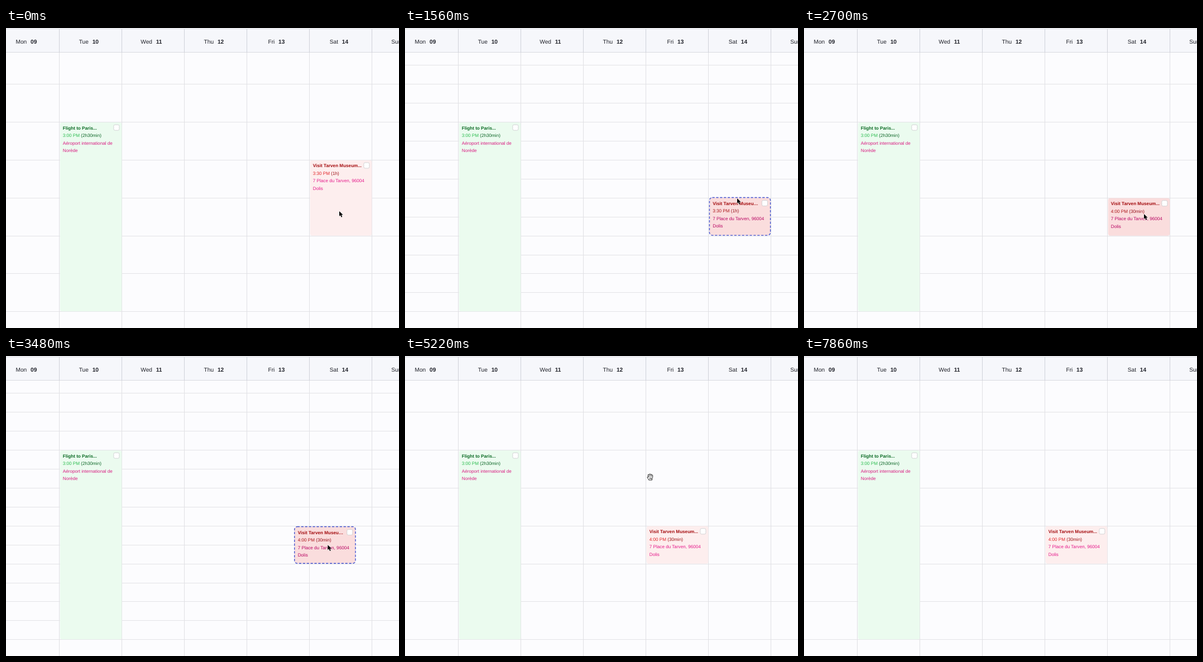
Animation, 704 px wide and 537 px high, one loop 7.92 s. Source, as an HTML page:

```html
<!DOCTYPE html>
<html lang="en">
<head>
<meta charset="utf-8">
<title>Week calendar</title>
<style>
  html, body { margin: 0; width: 100%; height: 100%; overflow: hidden; background: #fcfcfe; }
  svg { display: block; width: 704px; height: 537px; }
  text { font: 8.14px "Liberation Sans", Arial, sans-serif; text-rendering: geometricPrecision; white-space: pre; }
  .day { font-size: 10.17px; fill: #20222a; }
  .title, .num { font-weight: bold; }
  .box { fill: var(--bg); }
  .title { fill: var(--title); }
  .time { fill: var(--time); }
  .len { fill: var(--len); }
  .place { fill: var(--place); }
  .check { fill: #fff; stroke: #c9cbcd; stroke-width: .8; }
  .green { --bg: #ebfbef; --title: #0c6b25; --time: #2cbd50; --len: #0b6526; --place: #d91c82; }
  .red { --bg: #fdeeee; --title: #a50d10; --time: #e2262a; --len: #9c1014; --place: #e5198a; }
  .red.hover { --bg: #fadddd; --title: #a30c0f; --time: #ac1519; --len: #96101a; --place: #b80562; }
  .edit .box { stroke: #4757d0; stroke-width: 1.4; stroke-dasharray: 4.3 2.6; }
</style>
</head>
<body>
<svg id="stage" viewBox="0 0 704 537"></svg>
<script>
const LOOP = 7920, STEP = 60;
const COL = 112, ROW = 67.85, COL0 = 95, ROW0 = 100.2;
const SAT = 543.5, FRI = 431.5, TOP_1H = 236.8, TOP_30 = 304.6, BOTTOM = 371.8;
const stage = document.getElementById("stage");

function add(parent, tag, attrs = {}, text) {
  const el = document.createElementNS("http://www.w3.org/2000/svg", tag);
  set(el, attrs);
  if (text !== undefined) el.textContent = text;
  parent.append(el);
  return el;
}
function set(el, attrs) {
  for (const k in attrs) el.setAttribute(k, attrs[k]);
}
const rect = (parent, x, y, width, height, fill) =>
  add(parent, "rect", { x, y, width, height, fill });

// Grid: hour rows always, half rows only while editing
const grid = add(stage, "g");
const halves = add(stage, "g");
for (let i = 0; i < 7; i++) {
  rect(grid, 0, Math.round(ROW0 + i * ROW), 704, 1, "#e3e3e6");
  rect(halves, 0, Math.round(ROW0 + (i - .5) * ROW), 704, 1, "#e3e3e6");
}
for (let i = 0; i < 6; i++) rect(grid, COL0 + i * COL, 44, 1, 493, "#e0e0e4");

// Header
const head = add(stage, "g");
rect(head, 0, 2, 704, 41, "#f6f7fb");
rect(head, 0, 1, 704, 1, "#d6d8de");
rect(head, 0, 43, 704, 1, "#d9dae0");
["Mon", "Tue", "Wed", "Thu", "Fri", "Sat", "Sun"].forEach((name, i) => {
  if (i < 6) rect(head, COL0 + i * COL, 2, 1, 42, "#cfd1d9");
  const label = add(head, "text", { class: "day", x: 36.4 + i * COL, y: 27.6, "text-anchor": "middle" });
  add(label, "tspan", {}, name);
  add(label, "tspan", { class: "num", dx: 6.8 }, String(9 + i).padStart(2, "0"));
});

function makeEvent(cls, lines) {
  const g = add(stage, "g", { class: cls });
  const ev = { g, box: add(g, "rect", { class: "box" }) };
  ev.title = add(g, "text", { class: "title" });
  ev.when = add(g, "text");
  ev.time = add(ev.when, "tspan", { class: "time" });
  ev.len = add(ev.when, "tspan", { class: "len" });
  ev.places = lines.map(s => add(g, "text", { class: "place" }, s));
  ev.check = add(g, "rect", { class: "check", width: 10, height: 10, rx: 2.4 });
  return ev;
}
function drawEvent(ev, x, top, bottom, o) {
  const pad = o.edit ? 1.5 : 0, inset = o.edit ? .7 : 0;
  set(ev.box, { x: x + 1.2 + inset, y: top + inset, width: 110.6 - 2 * inset, height: bottom - top - 2 * inset, rx: o.edit ? 5 : 4 });
  [ev.title, ev.when, ...ev.places].forEach((el, i) =>
    set(el, { x: x + 6.3 + pad, y: top + 12.5 + pad + i * 13.56 }));
  set(ev.check, { x: x + 97.4 - pad, y: top + 4.2 + pad });
  ev.title.textContent = o.title;
  ev.time.textContent = o.time;
  ev.len.textContent = " " + o.len;
}

const flight = makeEvent("green", ["Aéroport international de", "Norède"]);
drawEvent(flight, 95.5, 169, 507.3, { title: "Flight to Paris...", time: "3:00 PM", len: "(2h30min)" });
const visit = makeEvent("red", ["7 Place du Tarven, 96004", "Dolis"]);

// Pointers
const arrow = add(stage, "path", {
  d: "M0 0V9L2.1 7.1L3.7 10.8L5.4 10L3.8 6.5H6.7Z",
  fill: "#000", stroke: "#fff", "stroke-width": 1, "stroke-linejoin": "round", "paint-order": "stroke"
});
const hand = add(stage, "g", { fill: "#fff", stroke: "#111", "stroke-width": .95, "stroke-linejoin": "round", "stroke-linecap": "round" });
add(hand, "path", { d: "M-2.4 5.6C-2.8 3.8-5 2.3-4.9 .9C-4.8-.1-3.4 0-2.7 1L-3.9-2.6C-4.1-4-2.4-4.4-1.9-3.2C-2-5.2 .3-5.4 .6-3.8C1.2-5 2.8-4.6 2.9-3.1C3.7-3.6 4.7-3 4.7-1.8C4.8 .6 4.6 2.2 3.5 3.8V5.6Z" });
add(hand, "path", { d: "M-1.9-3.2L-1.2-.4M.6-3.8L.8-.6M2.9-3.1L2.7-.4M-.6 2V3.8M.9 2V3.8M2.3 2V3.8", fill: "none", "stroke-width": .75 });

// Pointer path: time, x, y
const path = [
  [0, 597, 328], [420, 597, 328], [840, 594.5, 239], [1020, 594.5, 239],
  [1560, 595, 305], [1680, 595, 306.8], [1740, 595, 306.8], [1980, 600, 272],
  [2160, 600, 272], [2520, 609, 333], [2760, 609, 333], [3000, 605, 338],
  [3300, 605, 338], [3840, 494.7, 338.5], [3900, 494.7, 338.5], [4080, 444, 207],
  [4260, 444, 207], [4560, 439, 216], [LOOP, 439, 216]
];
function pointerAt(t) {
  const i = path.findIndex(p => p[0] > t);
  const [t0, x0, y0] = path[i - 1], [t1, x1, y1] = path[i];
  const u = (t - t0) / (t1 - t0), e = u * u * (3 - 2 * u);
  return [x0 + (x1 - x0) * e, y0 + (y1 - y0) * e];
}

function draw(t) {
  const [px, py] = pointerAt(t);
  const edit = (t >= 420 && t < 2040) || (t >= 3060 && t < 4260);
  const short = t >= 1740;
  let x = SAT, dy = 0;
  let top = short ? TOP_30 : Math.min(TOP_30, TOP_1H);
  if (t >= 1020 && t < 1740) top = Math.max(TOP_1H, py - 2.2);
  if (t >= 3300 && t < 3840) { x = SAT + px - 605; dy = py - 338; }
  else if (t >= 3840 && t < 4260) { x = SAT - 110.3; dy = .6; }
  else if (t >= 4260) x = FRI;
  const hover = t >= STEP && px > x && px < x + COL && py >= top && py < BOTTOM;

  halves.style.display = edit ? "" : "none";
  visit.g.setAttribute("class", "red" + (hover ? " hover" : "") + (edit ? " edit" : ""));
  drawEvent(visit, x, top + dy, BOTTOM + dy, {
    edit,
    title: edit ? "Visit Tarven Museu…" : "Visit Tarven Museum...",
    time: short ? "4:00 PM" : "3:30 PM",
    len: short ? "(30min)" : "(1h)"
  });

  const grab = t >= 4320;
  arrow.style.display = grab ? "none" : "";
  hand.style.display = grab && t < 6900 ? "" : "none";
  set(grab ? hand : arrow, { transform: `translate(${px} ${py})` });
}

const start = performance.now();
function tick() {
  const t = (performance.now() - start) % LOOP;
  draw(Math.floor(t / STEP) * STEP);
  requestAnimationFrame(tick);
}
tick();
</script>
</body>
</html>
```
